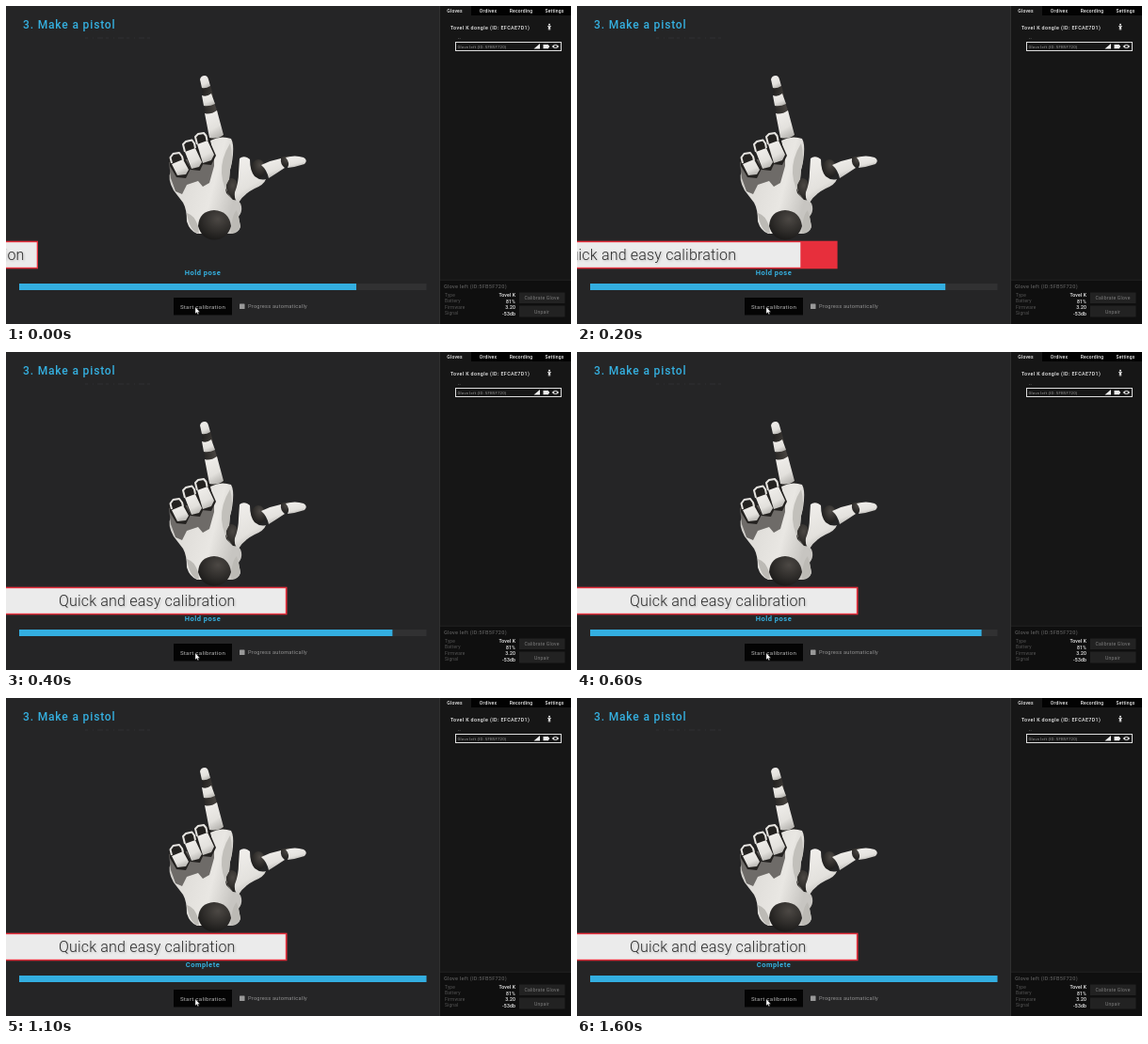
An HTML page for the animation above (1700 ms loop, 600 px wide and 338 px high).

```html
<!DOCTYPE html>
<html lang="en">
<head>
<meta charset="utf-8">
<title>Glove calibration</title>
<style>
  html, body { margin: 0; width: 100%; height: 100%; overflow: hidden; background: #252526; }
  svg { display: block; width: 600px; height: 338px; font-family: Roboto, sans-serif; }
  .title { font-size: 12px; font-weight: 500; letter-spacing: .84px; fill: #35b0e0; }
  .status { font-size: 7.5px; font-weight: 700; letter-spacing: .5px; fill: #35b0e0; }
  .banner { font-size: 16px; font-weight: 300; letter-spacing: .18px; fill: #2c2c2c; filter: drop-shadow(1px 1px 1px #0003); }
  .action { font-size: 6.2px; letter-spacing: .26px; fill: #b4b4b4; }
  .option { font-size: 5.6px; letter-spacing: .26px; fill: #929292; }
  .tab { font-size: 5px; font-weight: 500; letter-spacing: .2px; fill: #eee; }
  .device { font-size: 5.3px; font-weight: 500; letter-spacing: .4px; fill: #eee; }
  .row { font-size: 4.4px; letter-spacing: .13px; fill: #999; }
  .heading { font-size: 5.5px; font-weight: 500; letter-spacing: .27px; fill: #585858; }
  .label { font-size: 4.8px; letter-spacing: .2px; fill: #555; }
  .value { font-size: 5.1px; font-weight: 500; letter-spacing: .15px; fill: #eee; text-anchor: end; }
  .button { font-size: 5.1px; letter-spacing: .2px; fill: #7c7c7c; }
  .mid { text-anchor: middle; }
</style>
</head>
<body>
<svg viewBox="0 0 600 338">
  <defs>
    <linearGradient id="shell" x1=".2" y1="0" x2=".6" y2="1">
      <stop stop-color="#f1efec"/><stop offset=".65" stop-color="#e3e1dd"/><stop offset="1" stop-color="#b8b6b2"/>
    </linearGradient>
    <linearGradient id="palm" x2="1" y2=".35">
      <stop stop-color="#aaa8a4"/><stop offset=".25" stop-color="#dddbd7"/>
      <stop offset=".7" stop-color="#e9e7e3"/><stop offset="1" stop-color="#c7c5c1"/>
    </linearGradient>
    <radialGradient id="ball" cx=".6" cy=".3" r=".75">
      <stop stop-color="#4c4844"/><stop offset="1" stop-color="#191817"/>
    </radialGradient>
  </defs>

  <rect width="460" height="338" fill="#252526"/>
  <path d="M84 34H156" stroke="#343435" stroke-width=".8" stroke-dasharray="3 5 1 4 6 3"/>
  <text class="title" x="18" y="24">3. Make a pistol</text>

  <g id="hand">
    <!-- joints behind the shells -->
    <g fill="url(#ball)">
      <path d="M208 85L217 84 220 96 209 97ZM210 104L221 102 225 114 212 116ZM214 136L231 134 234 148 216 148Z"/>
      <ellipse cx="239" cy="196" rx="9" ry="13"/>
      <ellipse cx="268" cy="173" rx="7.5" ry="10"/>
      <path d="M290 161L302 159 303 169 293 172Z"/>
    </g>
    <!-- palm -->
    <path fill="url(#palm)" d="M217 143Q228 137 239 141Q242 146 241 158Q240 168 238 174L237 184Q231 190 234 199L241 206Q249 206 250 213Q251 219 247 224L249 235Q247 241 240 242L203 242Q195 239 192 229Q192 216 188 209L178 196Q171 184 175 175L206 166L220 158Z"/>
    <path fill="#c2c0bb" d="M238 146Q228 162 229 178Q230 194 241 206Q233 199 234 190L237 184 238 174Q242 160 238 146Z"/>
    <path fill="#bcbab5" d="M192 220Q200 222 204 234L205 242Q195 240 192 220ZM245 217Q239 223 239 242Q247 240 249 234L247 224Z"/>
    <path fill="url(#ball)" d="M204 234Q205 218 221 217Q237 218 239 234Q235 248 221 248.5Q208 248 204 234Z"/>
    <!-- shadow under the curled fingers -->
    <path fill="#6e6b68" d="M173 166L175 183 180 197 187 200 192 190 204 186 209 192 216 188 221 170 221 158Z"/>
    <g fill="#242220">
      <path d="M173 161L187 156 196 173 191 183 181 182 174 170Z"/>
      <path d="M187 147L200 144 210 166 206 175 196 174Z"/>
      <path d="M200 139L213 136 223 159 218 169 208 168Z"/>
    </g>
    <!-- index finger -->
    <g fill="url(#shell)">
      <path d="M206 78Q207 74 211 74Q214 74 215 78L217 85Q212 88 208 87Z"/>
      <path d="M208 95Q213 97 218 93L222 104Q216 107 210 106Z"/>
      <path d="M211 114Q217 116 224 111L231 137Q225 142 216 140Z"/>
    </g>
    <!-- curled fingers: bodies, then open tips -->
    <g fill="url(#shell)">
      <path d="M176 168L188 163 194 174 191 179 182 180Z"/>
      <path d="M190 155L201 151 208 166 205 171 197 173Z"/>
      <path d="M203 147L214 143 221 158 218 164 209 167Z"/>
    </g>
    <g fill="none" stroke="#e6e4e0" stroke-width="2" stroke-linejoin="round">
      <path d="M176 167L174.5 161 177.5 157 184 156 187 160 188 164"/>
      <path d="M190 155L188 147 191 144 197.5 142.5 200 146 201 151"/>
      <path d="M203 147L201 139 204 136 210 135 212.5 138 213.5 143"/>
    </g>
    <!-- thumb -->
    <g fill="url(#shell)">
      <path d="M248 162Q253 158 259 163Q259 175 264 181Q270 186 276 184Q274 190 264 194Q252 200 247 209Q242 207 243 198Q247 188 247 177Z"/>
      <path d="M271 169Q281 164 292 162Q291 168 296 172Q287 178 279 183Q277 174 271 169Z"/>
      <path d="M297 161Q307 158 316 161Q321 164 317 168Q308 171 299 172Q302 167 297 161Z"/>
    </g>
  </g>

  <text class="status mid" id="status" x="209" y="286"></text>
  <rect x="14" y="295" width="432.5" height="7" fill="#313132"/>
  <rect id="fill" x="14" y="295" height="7" fill="#33aee0"/>

  <rect x="178" y="310" width="62" height="18.5" fill="#040404"/>
  <text class="action mid" x="209" y="322">Start calibration</text>
  <rect x="248" y="316.5" width="5.5" height="5.5" rx=".6" fill="#999"/>
  <text class="option" x="257" y="321.3">Progress automatically</text>
  <path d="M201 320V327L202.6 325.6 203.6 327.8 204.7 327.3 203.7 325.2H205.8Z" fill="#fff" stroke="#222" stroke-width=".3"/>

  <rect id="frame" y="249.7" height="29.6" fill="#e72f3c"/>
  <rect id="plate" y="251.2" height="26.6" fill="#ebebeb"/>
  <text class="banner" id="caption" y="269.8">Quick and easy calibration</text>

  <rect x="460" width="140" height="338" fill="#161616"/>
  <path d="M460.5 0V338" stroke="#303030"/>
  <rect x="494" width="106" height="10" fill="#020202"/>
  <g class="tab mid">
    <text x="476.5" y="7">Gloves</text>
    <text x="512" y="7">Ordivex</text>
    <text x="547" y="7">Recording</text>
    <text x="582.5" y="7">Settings</text>
  </g>
  <text class="device" x="472" y="24.5">Tovel K dongle (ID: EFCAE7D1)</text>
  <g fill="#eee">
    <circle cx="577" cy="19.8" r="1"/>
    <path d="M575 21.2H579V22.1H578.1L578.2 25.6H577.3V24H576.7V25.6H575.8L575.9 22.1H575Z"/>
    <path d="M560.5 45.5L567 40V45.5ZM570.5 41H576V42H577V44.3H576V45.3H570.5Z"/>
    <path d="M579.7 43Q583.5 38.8 587.3 43Q583.5 47.2 579.7 43Z"/>
  </g>
  <circle cx="583.5" cy="43" r="1.3" fill="#111"/>
  <path d="M480 34.5H483" stroke="#555" stroke-width=".7" stroke-dasharray="1 .7"/>
  <rect x="477.5" y="38.5" width="112" height="9" fill="none" stroke="#ddd"/>
  <text class="row" x="479.5" y="44.6">Glove left (ID: 5FB5F720)</text>

  <rect x="461" y="291" width="139" height="47" fill="#0f0f0f"/>
  <path d="M461 291.3H600" stroke="#292929" stroke-width=".7"/>
  <text class="heading" x="465" y="299.7">Glove left (ID:5FB5F720)</text>
  <g class="label">
    <text x="466" y="308.8">Type</text>
    <text x="466" y="315.3">Battery</text>
    <text x="466" y="321.8">Firmware</text>
    <text x="466" y="328.3">Signal</text>
  </g>
  <g class="value">
    <text x="541" y="309">Tovel K</text>
    <text x="541" y="315.5">81%</text>
    <text x="541" y="322">3.20</text>
    <text x="541" y="328.5">-53db</text>
  </g>
  <path d="M545 304.5H593.5V316H545ZM545 318.5H593.5V330.5H545Z" fill="#222"/>
  <g class="button mid">
    <text x="569" y="312.3">Calibrate Glove</text>
    <text x="569" y="326.5">Unpair</text>
  </g>
</svg>
<script>
  const LOOP = 1700, STEP = 100;
  const byId = id => document.getElementById(id);
  const [status, fill, frame, plate, caption] =
    ["status", "fill", "frame", "plate", "caption"].map(byId);

  function draw() {
    const step = Math.floor(performance.now() % LOOP / STEP);
    const grow = (start, speed, end) => Math.min(end, start + speed * step);
    fill.setAttribute("width", grow(358, 9.6, 432.5));
    frame.setAttribute("width", grow(34, 121.3, 298.5));
    plate.setAttribute("width", grow(32.7, 102.3, 296.8));
    caption.setAttribute("x", grow(-168, 74.8, 56));
    status.textContent = step < 8 ? "Hold pose" : "Complete";
    requestAnimationFrame(draw);
  }
  draw();
</script>
</body>
</html>
```
